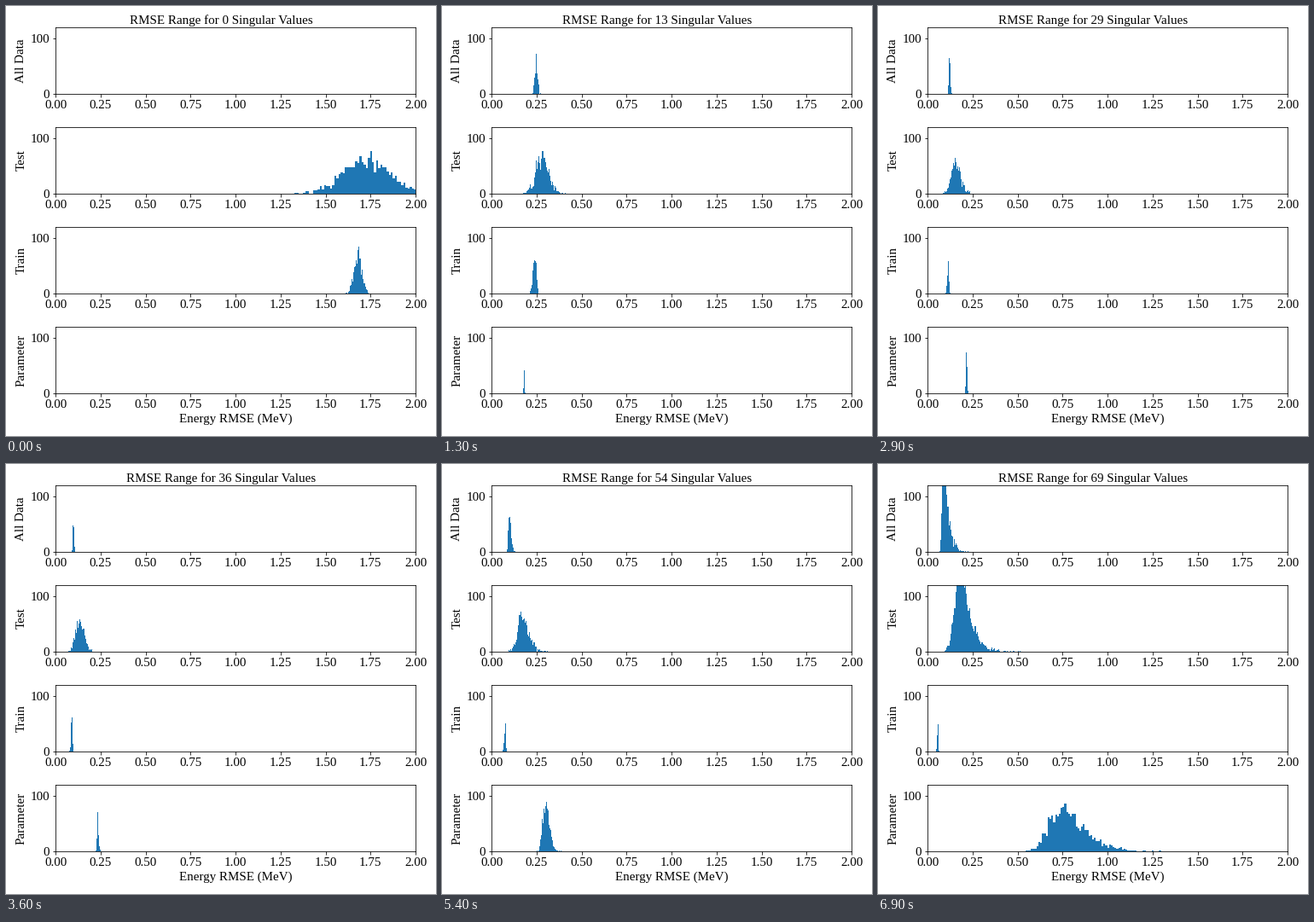
A matplotlib script for the animation above (7000 ms loop, 504 by 504 pixels).

```python
import numpy as np
import matplotlib.pyplot as plt
from matplotlib.animation import FuncAnimation

SIZE, DPI = 504, 72
FRAMES, INTERVAL = 70, 100
BINS = 80
FONT = 15

plt.rcParams["font.family"] = "Liberation Serif"

# Rows: singular values, mode, left width, right width, bar height at the mode
SERIES = {
    "All Data": [
        (1, 1.30, 0.028, 0.028, 60),
        (6, 0.363, 0.017, 0.019, 55),
        (22, 0.152, 0.0055, 0.006, 75),
        (36, 0.099, 0.004, 0.006, 65),
        (54, 0.099, 0.007, 0.013, 72),
        (63, 0.086, 0.008, 0.021, 100),
        (69, 0.088, 0.009, 0.030, 190),
    ],
    "Test": [
        (0, 1.72, 0.175, 0.19, 60),
        (6, 0.385, 0.058, 0.062, 72),
        (22, 0.183, 0.037, 0.043, 55),
        (36, 0.128, 0.026, 0.042, 55),
        (54, 0.170, 0.034, 0.052, 64),
        (63, 0.178, 0.040, 0.065, 88),
        (69, 0.183, 0.042, 0.060, 160),
    ],
    "Train": [
        (0, 1.68, 0.030, 0.030, 68),
        (6, 0.357, 0.020, 0.017, 78),
        (22, 0.148, 0.010, 0.006, 55),
        (36, 0.091, 0.0065, 0.0045, 68),
        (54, 0.078, 0.008, 0.0035, 55),
        (63, 0.061, 0.006, 0.004, 52),
        (69, 0.058, 0.006, 0.003, 48),
    ],
    "Parameter": [
        (1, 0.012, 0.0006, 0.001, 60),
        (3, 0.090, 0.001, 0.0015, 60),
        (6, 0.167, 0.0012, 0.002, 60),
        (22, 0.200, 0.0035, 0.004, 95),
        (36, 0.234, 0.004, 0.008, 60),
        (54, 0.300, 0.022, 0.032, 88),
        (63, 0.510, 0.075, 0.085, 74),
        (69, 0.735, 0.090, 0.170, 80),
    ],
}
# How far the right tail's exponent falls below a Gaussian's at the end
TAIL_DROP = {"All Data": 0.8, "Test": 0.8, "Train": 0.0, "Parameter": 0.4}

# Fixed counting noise for every frame, so each loop is the same
np.random.seed(7)
NOISE = {name: np.random.normal(size=(FRAMES, BINS)) for name in SERIES}


def histogram(name, k):
    """Return bar heights and bin edges for k singular values."""
    rows = np.array(SERIES[name])
    keys = rows[:, 0]
    mode, left, right = (
        np.exp(np.interp(k, keys, np.log(rows[:, c]))) for c in (1, 2, 3)
    )
    level = np.interp(k, keys, rows[:, 4]) if k >= keys[0] else 0
    power = 2 - TAIL_DROP[name] * np.clip((k - 50) / 15, 0, 1)

    edges = np.linspace(mode - left * 5**0.5,
                        mode + right * 8 ** (1 / power), BINS + 1)
    d = (edges[:-1] + edges[1:]) / 2 - mode
    decay = np.where(d < 0, (d / left) ** 2, (np.abs(d) / right) ** power)
    mean = level * np.exp(-decay)
    counts = np.round(mean + np.sqrt(mean) * NOISE[name][k])
    return np.maximum(counts, 0), edges


def style(ax, name):
    ax.set_xlim(0, 2)
    ax.set_ylim(0, 120)
    ax.set_xticks(np.arange(0, 2.01, 0.25))
    ax.set_yticks([0, 100])
    ax.xaxis.set_major_formatter("{x:.2f}")
    ax.tick_params(labelsize=FONT)
    ax.set_ylabel(name, fontsize=FONT)


fig, axes = plt.subplots(4, 1, figsize=(SIZE / DPI, SIZE / DPI), dpi=DPI)
fig.subplots_adjust(left=58 / SIZE, right=480 / SIZE,
                    bottom=50 / SIZE, top=479 / SIZE, hspace=0.5)
title = fig.suptitle("", fontsize=FONT)

bars = {}
for ax, name in zip(axes, SERIES):
    bars[name] = ax.stairs(*histogram(name, 0), fill=True, color="#1f77b4")
    style(ax, name)
axes[-1].set_xlabel("Energy RMSE (MeV)", fontsize=FONT)


def draw(k):
    title.set_text(f"RMSE Range for {k} Singular Values")
    for name, patch in bars.items():
        patch.set_data(*histogram(name, k))
    return [title, *bars.values()]


anim = FuncAnimation(fig, draw, frames=FRAMES, interval=INTERVAL,
                     init_func=lambda: draw(0), repeat=True, repeat_delay=0)
plt.show()
```
